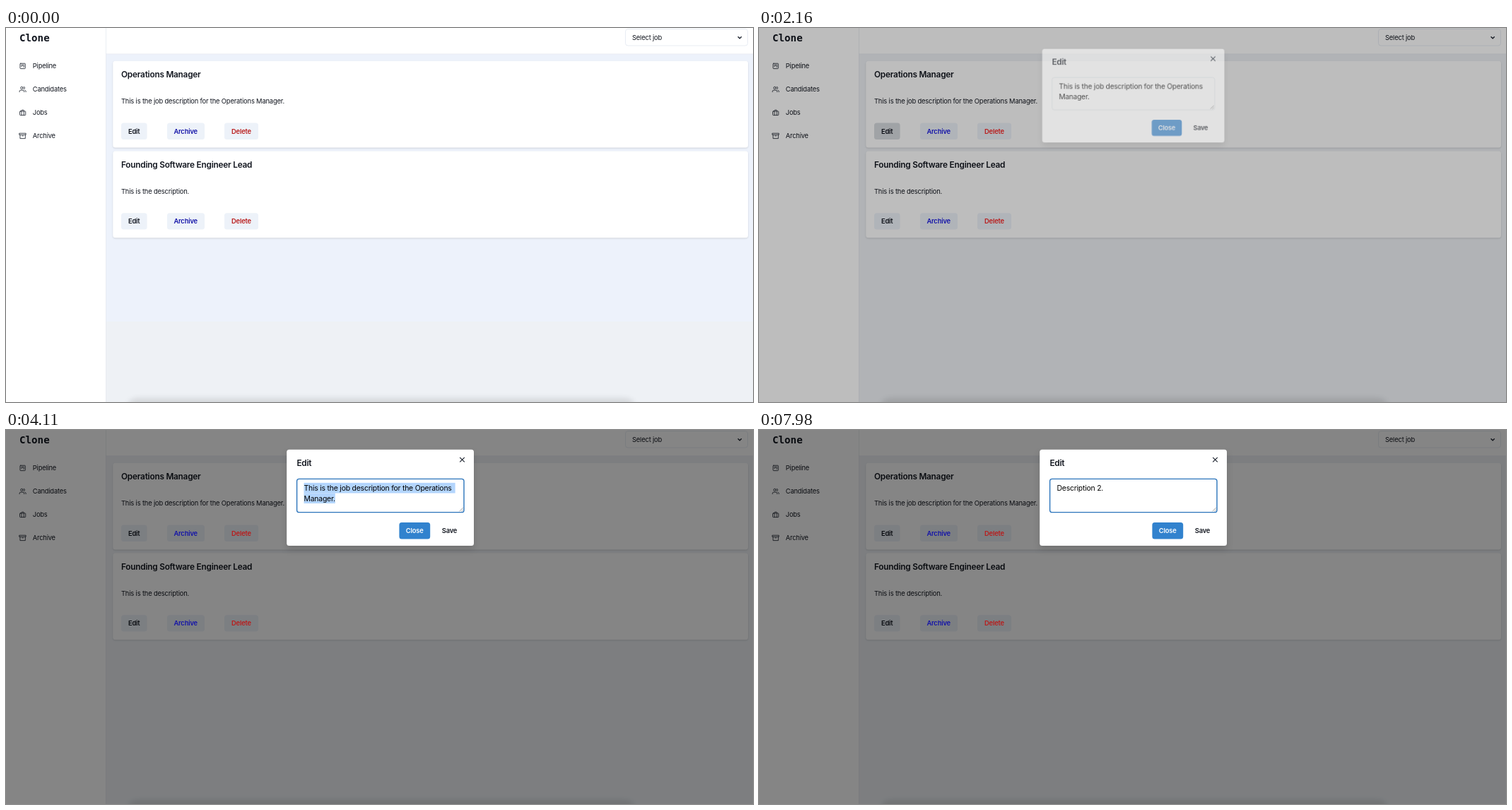
These frames come from a looping animation (1057 by 530 pixels, 8 s). An HTML page:

```html
<!DOCTYPE html>
<html lang="en">
<head>
<meta charset="utf-8">
<title>Jobs</title>
<style>
  html, body { margin: 0; width: 100%; height: 100%; overflow: hidden; background: #fff; }
  svg { display: block; width: 1057px; height: 530px; }
  text { font: 9.4px Inter, sans-serif; letter-spacing: -.019em; fill: #12161f; white-space: pre; }
  .logo { font: bold 14.2px "DejaVu Sans Mono", monospace; letter-spacing: 0; }
  .nav text { font-size: 9.3px; }
  .title { font-size: 11.8px; font-weight: 600; }
  .label { font-weight: 600; text-anchor: middle; }
  .area { font-size: 10.4px; fill: #000; }
  .icon { fill: none; stroke: #1a202c; stroke-width: 2; stroke-linecap: round; stroke-linejoin: round; }
  .card { fill: #fff; filter: drop-shadow(0 1px 1px rgba(0, 0, 0, .13)); }
  .btn { fill: #edf2f9; }
  .archive { fill: #1414a8; }
  .delete { fill: #b91c1c; }
  .panel { fill: #fff; filter: drop-shadow(0 5px 5px rgba(0, 0, 0, .14)); }
  .mark { fill: #b3d5fd; }

  #upper { animation: tint 8s step-end infinite; }
  #edit { animation: press 8s linear infinite; }
  #shade { animation: shade 8s infinite; }
  #modal { transform-origin: 529.5px 96px; animation: pop 8s infinite; }
  #field { animation: focus 8s linear infinite; }

  @keyframes tint {
    0% { fill: #edf2fb; }
    26.95%, 100% { fill: #eef1f5; }
  }
  @keyframes press {
    0%, 22.3% { fill: #edf2f9; }
    24.75%, 25.2% { fill: #e2e6ec; }
    25.85%, 27% { fill: #d8dbdf; }
    28.9%, 100% { fill: #edf2f9; }
  }
  @keyframes shade {
    0%, 26.94% { opacity: 0; animation-timing-function: step-end; }
    26.95% { opacity: .5; animation-timing-function: cubic-bezier(0, 0, .3, 1); }
    29%, 100% { opacity: 1; }
  }
  @keyframes pop {
    0%, 26.94% { opacity: 0; transform: scale(.95); animation-timing-function: step-end; }
    26.95% { opacity: .52; transform: scale(.971); animation-timing-function: cubic-bezier(0, 0, .3, 1); }
    29%, 100% { opacity: 1; transform: scale(1); }
  }
  @keyframes focus {
    0%, 41% { stroke: #dde3ea; stroke-width: .7px; }
    43.875%, 100% { stroke: #2b74bb; stroke-width: 1.4px; }
  }
</style>
</head>
<body>
<svg viewBox="0 0 1057 530">
  <defs>
    <filter id="soft" x="-5%" y="-150%" width="110%" height="400%"><feGaussianBlur stdDeviation="4"/></filter>
  </defs>

  <rect width="1057" height="530" fill="#fff"/>
  <rect x="141" y="37" width="916" height="493" fill="#eef1f5"/>
  <rect id="upper" x="141" y="37" width="916" height="379"/>
  <path d="M141.5 0V530M141 36.8H1057" fill="none" stroke="#e6eaf0" stroke-width=".8"/>
  <rect x="172" y="525" width="718" height="40" rx="14" fill="#000" opacity=".11" filter="url(#soft)"/>

  <text class="logo" x="19" y="18.6">Clone</text>
  <g class="icon">
    <g transform="translate(18.7 49) scale(.41)">
      <rect x="3" y="3" width="18" height="18" rx="2"/><path d="M8 7v7M12 7v4M16 7v9"/>
    </g>
    <g transform="translate(18.7 82) scale(.41)">
      <circle cx="9" cy="7" r="4"/>
      <path d="M17 21v-2a4 4 0 0 0-4-4H5a4 4 0 0 0-4 4v2M23 21v-2a4 4 0 0 0-3-3.9M16 3.1a4 4 0 0 1 0 7.8"/>
    </g>
    <g transform="translate(18.7 115) scale(.41)">
      <rect x="2" y="7" width="20" height="14" rx="2"/><path d="M16 21V5a2 2 0 0 0-2-2h-4a2 2 0 0 0-2 2v16"/>
    </g>
    <g transform="translate(18.7 148) scale(.41)">
      <path d="M21 8v13H3V8M1 3h22v5H1zM10 12h4"/>
    </g>
  </g>
  <g class="nav">
    <text x="37.8" y="57.4">Pipeline</text>
    <text x="37.8" y="90.4">Candidates</text>
    <text x="37.8" y="123.4">Jobs</text>
    <text x="37.8" y="156.4">Archive</text>
  </g>

  <rect x="876.5" y="1.5" width="173" height="23.5" rx="3.5" fill="#fff" stroke="#e2e8f0" stroke-width=".8"/>
  <text x="886" y="16.7">Select job</text>
  <path d="M1035.6 12.2l2.6 2.6 2.6-2.6" fill="none" stroke="#1a202c" stroke-width="1.3"/>

  <rect class="card" x="151.3" y="46.8" width="898.7" height="122.8" rx="3.5"/>
  <text class="title" x="163" y="70.2">Operations Manager</text>
  <text x="163" y="107.2">This is the job description for the Operations Manager.</text>
  <rect class="btn" id="edit" x="163" y="134.5" width="36.6" height="23.4" rx="3.5"/>
  <rect class="btn" x="228" y="134.5" width="53" height="23.4" rx="3.5"/>
  <rect class="btn" x="309" y="134.5" width="48" height="23.4" rx="3.5"/>
  <text class="label" x="181.2" y="149.6">Edit</text>

  <rect class="card" x="151.3" y="174.6" width="898.7" height="122.6" rx="3.5"/>
  <text class="title" x="163" y="198">Founding Software Engineer Lead</text>
  <text x="163" y="235">This is the description.</text>
  <rect class="btn" x="163" y="262.2" width="36.6" height="23.4" rx="3.5"/>
  <rect class="btn" x="228" y="262.2" width="53" height="23.4" rx="3.5"/>
  <rect class="btn" x="309" y="262.2" width="48" height="23.4" rx="3.5"/>
  <text class="label" x="181.2" y="277.4">Edit</text>

  <rect id="shade" width="1057" height="530" fill="rgba(0,0,0,.48)"/>

  <!-- coloured labels keep their strength over the shade -->
  <text class="label archive" x="254.2" y="149.6">Archive</text>
  <text class="label delete" x="333" y="149.6">Delete</text>
  <text class="label archive" x="254.2" y="277.4">Archive</text>
  <text class="label delete" x="333" y="277.4">Delete</text>

  <g id="modal">
    <rect class="panel" x="397.2" y="27.8" width="264.8" height="136.2" rx="3.5"/>
    <text class="title" x="411.4" y="50.6">Edit</text>
    <path d="M642.2 38.8l6.6 6.6M648.8 38.8l-6.6 6.6" stroke="#1a202c" stroke-width="1.1"/>
    <rect id="field" x="411.6" y="69.4" width="236.4" height="47.2" rx="3.2" fill="#fff"/>
    <path d="M641.6 115.2l5-5M644.4 115.2l2.2-2.2" stroke="#777" stroke-width=".7"/>
    <rect class="mark" id="mark1" y="74.8" height="14.7"/>
    <rect class="mark" id="mark2" y="89.5" height="14.5"/>
    <text class="area" id="line1" x="421.5" y="86.1">This is the job description for the Operations</text>
    <text class="area" id="line2" x="421.5" y="100.6">Manager.</text>
    <text class="area" id="typed" x="421.5" y="86.1"></text>
    <rect id="caret" y="75" width="1" height="13" fill="#000"/>
    <rect x="556.4" y="130.9" width="43.8" height="23.6" rx="3.5" fill="#3182ce"/>
    <text class="label" x="578.2" y="146.3" style="fill:#fff">Close</text>
    <text class="label" x="627.5" y="146.3">Save</text>
  </g>
</svg>
<script>
  const $ = id => document.getElementById(id);
  const LEFT = 421.5, WORD = 3690, ALL = 3870, CLEAR = 4710, BLINK = 450;
  const phrase = 'Description 2.';
  const keys = [4830, 5070, 5250, 5460, 5490, 5650, 6270, 6390, 6480, 6600, 6720, 6900, 7200, 7500];
  const clock = $('shade').getAnimations()[0];

  const show = (el, on) => el.setAttribute('visibility', on ? 'inherit' : 'hidden');

  function span(el, x, width) {
    el.setAttribute('x', x);
    el.setAttribute('width', width);
  }

  function drawMarks(t) {
    const all = t >= ALL;
    show($('mark1'), t >= WORD && t < CLEAR);
    show($('mark2'), all && t < CLEAR);
    if (all) {
      span($('mark1'), LEFT, $('line1').getComputedTextLength() + 5);
      span($('mark2'), LEFT, $('line2').getComputedTextLength());
    } else {
      const word = 'description', at = $('line1').textContent.indexOf(word);
      span($('mark1'), $('line1').getStartPositionOfChar(at).x, $('line1').getSubStringLength(at, word.length));
    }
  }

  function drawTyping(t) {
    const count = keys.filter(k => k <= t).length;
    const text = phrase.slice(0, count);
    const last = count ? keys[count - 1] : CLEAR;
    if ($('typed').textContent !== text) $('typed').textContent = text;
    const width = count ? $('typed').getComputedTextLength() : 0;
    $('caret').setAttribute('x', LEFT - .3 + width);
    show($('caret'), t >= CLEAR && Math.floor((t - last) / BLINK) % 2 === 0);
  }

  function frame() {
    const t = (clock.currentTime || 0) % 8000;
    show($('line1'), t < CLEAR);
    show($('line2'), t < CLEAR);
    drawMarks(t);
    drawTyping(t);
    requestAnimationFrame(frame);
  }
  frame();
</script>
</body>
</html>
```
